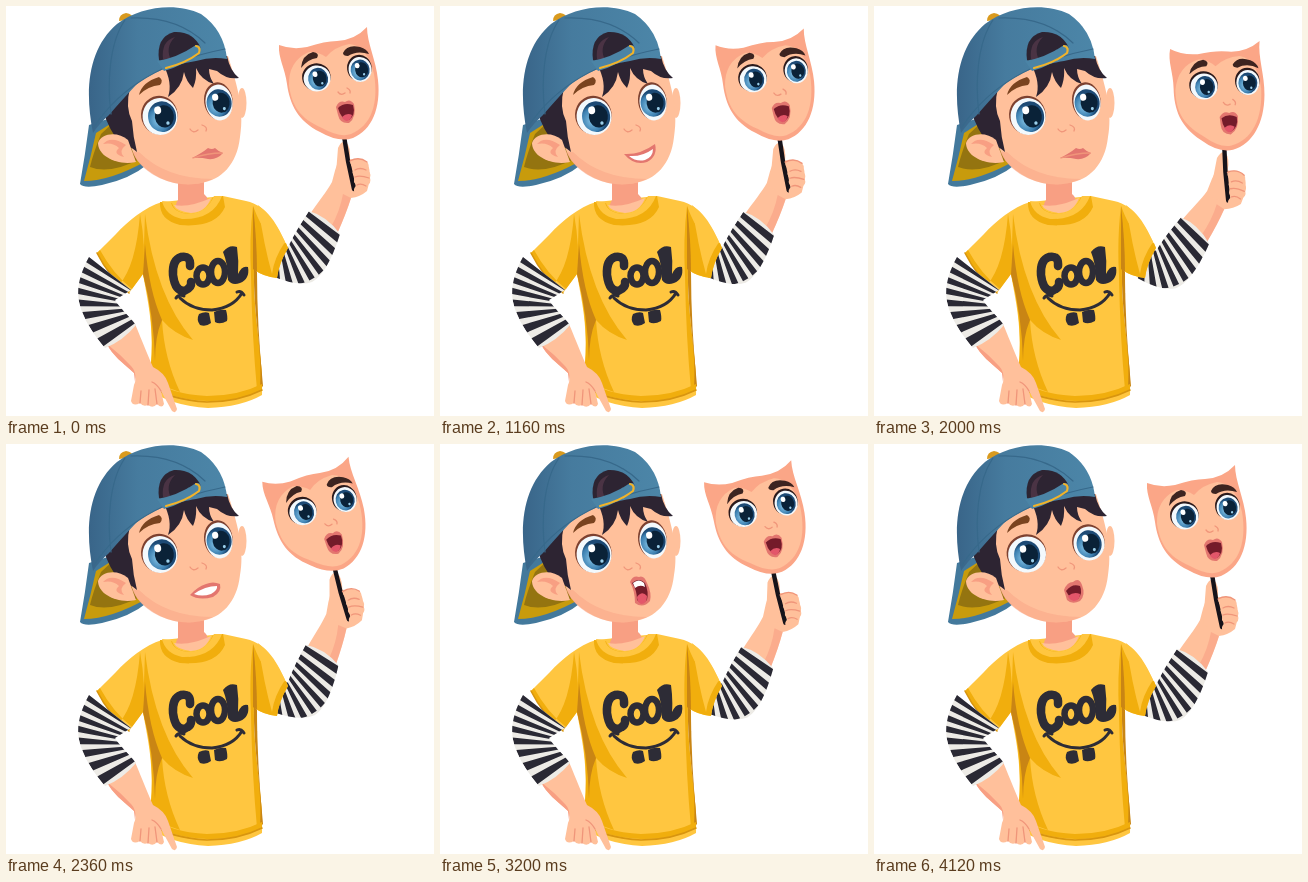
Animation of 428x410 px, one loop 4.52 s. Source, as an HTML page:

```html
<!DOCTYPE html>
<html lang="en">
<head>
<meta charset="utf-8">
<title>Boy with a mask</title>
<style>
html, body { margin: 0; width: 100%; height: 100%; overflow: hidden; background: #fff; }
svg { display: block; width: 428px; height: 410px; }
path, ellipse { stroke-linecap: round; stroke-linejoin: round; }
.skin { fill: #ffc09b; }
.shade { fill: #f89f83; }
.fold { fill: none; stroke: #f0957a; stroke-width: 1.3; }
.hair { fill: #2d2432; }
.brow { fill: #7a431f; }
.cloth { fill: #edebe6; }
.stripe { fill: #2a2934; }
.shirt { fill: #ffc640; }
.gold { fill: #f1ae0d; }
.brown { fill: #c98514; }
.seam { fill: none; stroke: #d8950f; stroke-width: 1.6; }
.lips { fill: #e3766f; }
.teeth { fill: #fff; }
.throat { fill: #741b2a; }
.tongue { fill: #e3566a; }
.letter { fill: none; stroke: #2d2c36; stroke-width: 8.5; }
.letter.round { stroke-width: 6.5; }
.letter.thin { stroke-width: 3; }
</style>
</head>
<body>
<svg viewBox="0 0 428 410">
  <defs>
    <linearGradient id="cap" x1="0" x2="1">
      <stop offset="0" stop-color="#396589"/><stop offset=".35" stop-color="#467b9e"/><stop offset="1" stop-color="#4c86a8"/>
    </linearGradient>
    <radialGradient id="iris" cx=".35" cy=".6">
      <stop offset=".2" stop-color="#74b4da"/><stop offset=".75" stop-color="#3c7fb0"/><stop offset="1" stop-color="#1d4a75"/>
    </radialGradient>
    <clipPath id="leftSleeve"><path d="M83 251C73 269 69 287 75 303C80 318 90 331 99 342Q117 335 130 319C122 309 113 301 109 294L125 284Z"/></clipPath>
    <clipPath id="rightSleeve"><path d="M262 236L282 241Q292 221 303 205Q321 210 334 228C328 247 319 269 306 276Q292 281 266 270Z"/></clipPath>
  </defs>

  <!-- swinging arm and mask -->
  <g id="arm">
    <path class="skin" d="M304 208C313 195 321 185 326 176Q329 163 333 153Q335 139 340 136Q345 141 344 153L360 155Q367 165 361 185Q354 191 345 192Q340 208 331 228Z"/>
    <path class="shade" d="M345 192Q340 208 331 228L325 221Q334 205 337 188Z" opacity=".6"/>
    <path class="skin" d="M332 142Q337 131 342 139Q343 151 339 160Q341 170 345 179Q338 187 329 180Z"/>
    <path d="M338 130L342 155L348 183" fill="none" stroke="#17131a" stroke-width="4.4"/>
    <path class="skin" d="M344 155Q353 150 361 156Q365 160 359 164Q366 165 364 172Q366 177 360 180Q357 188 349 187Q346 183 351 179Q346 176 349 171Q344 166 349 163Q344 160 344 155Z"/>
    <path class="fold" d="M349 164Q354 161 360 164M349 171Q354 169 363 172M351 179Q355 177 360 180M344 155Q353 150 361 156"/>
    <g clip-path="url(#rightSleeve)">
      <path class="cloth" d="M255 200h85v90h-85z"/>
      <g id="rightStripes"></g>
    </g>
    <path fill="#fba687" d="M273 39Q286 44 301 41Q319 35 331 35Q349 34 361 21C361 37 370 54 372 74C375 102 366 124 347 132Q333 137 314 126C292 115 284 99 281 78C279 62 272 52 273 39Z"/>
    <path class="skin" d="M283 80Q282 55 303 46Q313 46 320 51Q328 41 343 38Q361 39 368 68C373 98 365 120 345 128Q334 132 316 122C293 112 286 99 283 80Z"/>
    <path fill="#3d2420" d="M295 62Q296 49 307 46Q314 47 311 52Q302 53 295 62ZM337 47Q341 38 354 41Q361 43 363 48Q351 44 342 50Q337 50 337 47Z"/>
    <g id="maskEyes"></g>
    <path class="fold" d="M332 86Q335 90 339 87M341 82Q345 84 344 87"/>
    <path class="lips" d="M330 101Q333 94 339 96Q344 92 348 98Q351 111 343 117Q334 118 332 109Z"/>
    <path class="throat" d="M332 102Q338 96 347 99Q350 109 343 114Q335 114 332 102Z"/>
    <path class="tongue" d="M336 111Q341 106 346 109Q345 114 341 115Q337 114 336 111Z"/>
  </g>

  <!-- shirt -->
  <path class="shirt" d="M156 196C139 201 122 215 110 228Q100 238 91 247Q103 271 123 287L137 268C142 298 151 330 142 383Q165 400 202 402Q235 401 256 389C258 355 247 315 247 263Q258 271 271 272Q273 257 282 242C271 218 262 200 240 195L217 190Z"/>
  <path class="gold" d="M134 208Q140 240 137 268L123 287L113 279Q130 260 134 208ZM91 247Q103 271 123 287L126 283Q107 268 94 244Z"/>
  <path class="gold" d="M247 200Q262 240 280 237L282 242Q273 257 271 272Q258 271 247 263Z"/>
  <path class="shirt" d="M252 199Q268 212 279 236Q268 252 266 268Q258 240 252 199Z"/>
  <path class="gold" d="M139 208Q149 290 187 334Q168 328 156 314Q158 352 174 386L143 375Q151 323 137 268Z"/>
  <path class="brown" d="M137 268L139 238Q143 285 156 314Q149 330 149 355Q148 310 137 268Z"/>
  <path class="gold" d="M247 200Q243 232 245 270Q246 330 251 384L256 382C257 350 247 310 248 263Z"/>
  <path class="brown" d="M247 200Q251 235 251 266L247 263Z"/>
  <path class="brown" d="M251 266Q251 320 257 380L254 383C257 345 247 310 248 263Z"/>
  <path class="gold" d="M143 372Q163 388 201 390Q232 390 256 378L256 384Q232 396 201 395Q163 393 143 378Z"/>
  <path class="seam" d="M143 379Q164 394 201 396Q232 396 256 384M91 247Q103 271 123 287"/>
  <path class="gold" d="M154 196Q153 214 174 219Q210 222 219 201L217 190L207 191Q200 207 185 208Q168 207 166 197Z"/>
  <path class="shirt" d="M156 195Q159 209 176 213Q207 214 216 190L208 190Q201 206 184 208Q167 207 165 196Z"/>
  <path class="shade" d="M172 174V194Q168 199 172 203Q185 209 200 199Q204 193 198 188V174Z"/>
  <path class="skin" d="M168 199Q183 202 205 192Q200 206 185 207Q170 205 168 199Z"/>
  <path class="letter" d="M184 260Q185 249 175 251Q166 254 167 269Q169 285 178 285Q186 282 185 276"/>
  <ellipse class="letter round" cx="197" cy="270" rx="6.5" ry="8.5"/>
  <ellipse class="letter round" cx="212" cy="266" rx="7" ry="11"/>
  <path fill="#2d2c36" d="M217 246Q223 238 231 241Q233 255 232 268Q236 259 242 261Q244 273 234 277Q226 280 222 274Q222 258 217 246Z"/>
  <path class="letter thin" d="M174 292Q186 304 206 304Q227 302 236 287M170 292Q173 288 178 290M231 286Q235 284 238 289"/>
  <path fill="#2d2c36" d="M193 308Q199 305 203 307L205 317Q200 321 194 319Q190 314 193 308ZM208 306Q214 303 220 304Q222 311 221 315Q214 319 209 316Z"/>

  <!-- resting arm -->
  <path class="skin" d="M101 338L129 318C137 337 142 350 147 361Q159 367 162 377L171 403Q170 408 166 405L155 385L158 398Q156 403 151 398Q147 403 142 399Q137 401 134 397Q127 401 125 395L128 379Q131 373 128 367C117 357 106 349 101 338Z"/>
  <path class="shade" d="M101 338Q114 348 125 360Q131 366 129 376L128 367C117 357 106 349 101 338Z"/>
  <path class="fold" d="M134 397L135 385M142 399L143 384M151 398L149 383M155 385Q151 378 146 376"/>
  <g clip-path="url(#leftSleeve)">
    <path class="cloth" d="M65 245h70v100h-70z"/>
    <g id="leftStripes"></g>
  </g>

  <!-- head -->
  <path fill="#43799c" d="M83 119Q79 150 74 178Q78 183 96 179Q124 173 142 158L111 110Z"/>
  <path fill="#c89b0c" d="M90 127Q85 150 78 175Q105 175 142 154L109 115Z"/>
  <path fill="#947410" d="M95 128Q87 148 84 161Q104 169 136 152L109 115Z"/>
  <ellipse class="skin" cx="236" cy="97" rx="4.5" ry="15"/>
  <path class="skin" d="M120 84C119 118 122 139 131 154C147 174 174 182 195 177C215 174 231 159 234 131C239 102 230 76 222 50L165 52Z"/>
  <path class="shade" opacity=".45" d="M126 146Q139 173 178 179Q193 179 207 173Q160 173 133 146Z"/>
  <path class="hair" d="M97 104L124 82Q119 101 126 115Q127 131 131 146Q123 139 115 138Q103 125 97 104Z"/>
  <path class="skin" d="M122 134C112 125 95 127 92 137C92 150 111 160 130 156Z"/>
  <path class="shade" d="M120 139Q105 129 97 138Q107 136 113 142Q106 148 118 151Q112 145 120 139Z"/>
  <path class="hair" d="M157 58L184 46L221 50Q224 65 233 72Q221 74 211 65L203 63Q203 71 208 78Q195 74 190 62Q191 73 187 82Q180 75 178 66Q176 82 162 91Q167 77 157 58Z"/>
  <path class="brow" d="M133 89Q136 76 153 71Q158 74 154 79Q142 80 133 89Z"/>
  <path fill="#d99a1e" d="M113 15Q113 8 120 7Q127 8 127 13Z"/>
  <path fill="url(#cap)" d="M87 127C78 82 83 42 111 18C134 0 171-4 195 8Q218 24 221 53Q206 50 190 55Q151 61 130 79Q115 95 103 109Q93 118 87 127Z"/>
  <path fill="none" stroke="#37698b" stroke-width="1.2" d="M119 14C103 37 101 78 105 108M125 12Q171 10 199 37M88 121Q127 61 219 43"/>
  <path class="hair" d="M153 54Q150 31 168 26Q187 25 195 42L184 50L160 62Z"/>
  <path fill="#4a3344" d="M157 53Q155 35 169 31Q158 42 166 56Z"/>
  <path fill="#4b84a6" d="M151 55Q171 52 190 39Q196 38 195 46Q179 59 158 65Z"/>
  <path fill="none" stroke="#f2b329" stroke-width="2.2" d="M160 62Q180 57 193 47Q195 41 190 40"/>
  <g id="eyes"></g>
  <path class="fold" d="M184 123Q187 128 192 124M196 119Q202 121 200 125"/>
  <g id="mouth"></g>
</svg>
<script>
const LOOP = 4520, STEP = 40, LAST = 98, SWINGS = 8;
const get = id => document.getElementById(id);
const shape = (kind, d) => `<path class="${kind}" d="${d}"/>`;

function eye(x, y, rx, ry, ix, iy, r, lash = '#7d4130') {
  const oval = (cx, cy, a, b, fill) =>
    `<ellipse cx="${cx}" cy="${cy}" rx="${a}" ry="${b}" fill="${fill}"/>`;
  return `<g transform="rotate(-8 ${x} ${y})">` +
    oval(x - .5, y - 1, rx + .8, ry + .8, lash) + oval(x, y + .5, rx, ry, '#f3f9fd') +
    oval(ix, iy, r, r * 1.1, 'url(#iris)') + oval(ix + r * .16, iy, r * .68, r * .8, '#0a2238') +
    oval(ix - r * .25, iy - r * .5, r * .25, r * .28, '#fff') +
    oval(ix + r * .35, iy + r * .5, r * .12, r * .13, '#9bd0ec') + '</g>';
}

const looks = {
  side: eye(154, 110, 17.5, 18.5, 156, 111, 14) + eye(213, 96, 13.5, 18, 213, 97, 12.5),
  ahead: eye(153, 110, 19, 18, 153, 111, 13) + eye(215, 99, 15.5, 17, 215, 100, 12.5)
};

const mouths = {
  closed: shape('lips', 'M186 152Q196 147 202 142Q206 144 209 142Q213 146 217 147Q211 154 202 153Q194 151 186 152Z') +
    shape('fold', 'M187 152Q202 147 216 147'),
  smile: shape('lips', 'M184 148Q200 149 215 138Q218 150 207 156Q194 160 184 148Z') +
    shape('teeth', 'M189 150Q202 151 213 143Q213 151 205 154Q196 156 189 150Z'),
  open: shape('lips', 'M190 138Q193 131 199 133Q204 131 207 139Q212 149 210 157Q203 165 195 159Q195 147 190 138Z') +
    shape('throat', 'M192 139Q199 133 205 139Q209 148 207 156Q202 161 197 156Q197 146 192 139Z') +
    shape('teeth', 'M193 139Q199 134 204 139L205 143Q200 140 195 144Z') +
    shape('tongue', 'M197 153Q202 146 207 152Q207 160 201 160Q197 158 197 153Z'),
  wide: shape('lips', 'M184 151Q191 143 200 140Q207 137 214 140Q216 148 207 153Q193 157 184 151Z') +
    shape('teeth', 'M188 150Q199 142 211 142Q212 146 205 150Q196 153 188 150Z'),
  talk: shape('lips', 'M185 152Q192 142 201 141Q206 138 211 143Q212 152 202 155Q192 157 185 152Z') +
    shape('throat', 'M189 151Q199 143 208 144Q209 150 202 152Q194 154 189 151Z') +
    shape('teeth', 'M190 149Q199 143 208 144Q206 149 190 150Z'),
  narrow: shape('lips', 'M186 153Q193 145 201 143Q208 139 214 145Q213 151 203 154Q192 156 186 153Z') +
    shape('teeth', 'M189 151Q200 146 210 145Q209 149 202 151Q195 153 189 151Z'),
  round: shape('lips', 'M190 146Q193 138 199 138Q205 133 208 141Q212 151 206 157Q198 161 193 156Z') +
    shape('throat', 'M192 147Q198 139 206 142Q209 149 204 155Q197 157 192 147Z') +
    shape('tongue', 'M194 152Q200 147 206 150Q206 156 200 157Q195 156 194 152Z')
};

// [start in ms, mouth]
const speech = [
  [0, 'closed'], [240, 'talk'], [400, 'wide'], [560, 'open'], [720, 'narrow'],
  [880, 'talk'], [1080, 'smile'], [1280, 'narrow'], [1440, 'wide'], [1600, 'open'],
  [1800, 'smile'], [1960, 'closed'], [2120, 'talk'], [2280, 'wide'], [2480, 'open'],
  [2640, 'narrow'], [2760, 'talk'], [2960, 'wide'], [3120, 'open'], [3280, 'smile'],
  [3480, 'narrow'], [3680, 'talk'], [3840, 'closed'], [4040, 'round']
];

// Point at t on a quadratic curve given by three points
function along([a, b, c], t) {
  const mix = k => (1 - t) ** 2 * a[k] + 2 * t * (1 - t) * b[k] + t * t * c[k];
  return `${mix(0).toFixed(1)} ${mix(1).toFixed(1)}`;
}

// Tapered bands fanning from the outer to the inner edge of a sleeve
function stripes(outer, inner, count) {
  let d = '';
  for (let i = 0; i < count; i++) {
    const from = (i + .2) / count, to = (i + .75) / count;
    d += `M${along(outer, from)}L${along(inner, from)}L${along(inner, to)}L${along(outer, to)}Z`;
  }
  return shape('stripe', d);
}

function put(id, markup) {
  const node = get(id);
  if (node.markup !== markup) node.innerHTML = node.markup = markup;
}

function draw() {
  const time = performance.now() % LOOP;
  const step = Math.min(LAST, Math.max(0, Math.floor(time / STEP) - 5));
  const phase = 2 * Math.PI * SWINGS * step / LAST;
  const angle = -5.9 * Math.sin(phase) - 1.6 * -Math.sin(2 * phase);
  get('arm').setAttribute('transform', `rotate(${angle.toFixed(3)} 250 243)`);
  put('mouth', mouths[speech.findLast(([start]) => start <= time)[1]]);
  put('eyes', time < 4040 ? looks.side : looks.ahead);
  requestAnimationFrame(draw);
}

put('leftStripes', stripes([[84, 248], [52, 286], [100, 344]], [[130, 282], [100, 294], [132, 318]], 8));
put('rightStripes', stripes([[264, 278], [322, 288], [336, 226]], [[268, 234], [282, 242], [304, 203]], 8));
put('maskEyes', eye(311, 72, 13.5, 13, 312, 73, 10, '#2b1a1c') + eye(354, 63, 11.5, 12.5, 354, 64, 9.5, '#2b1a1c'));
draw();
</script>
</body>
</html>
```
